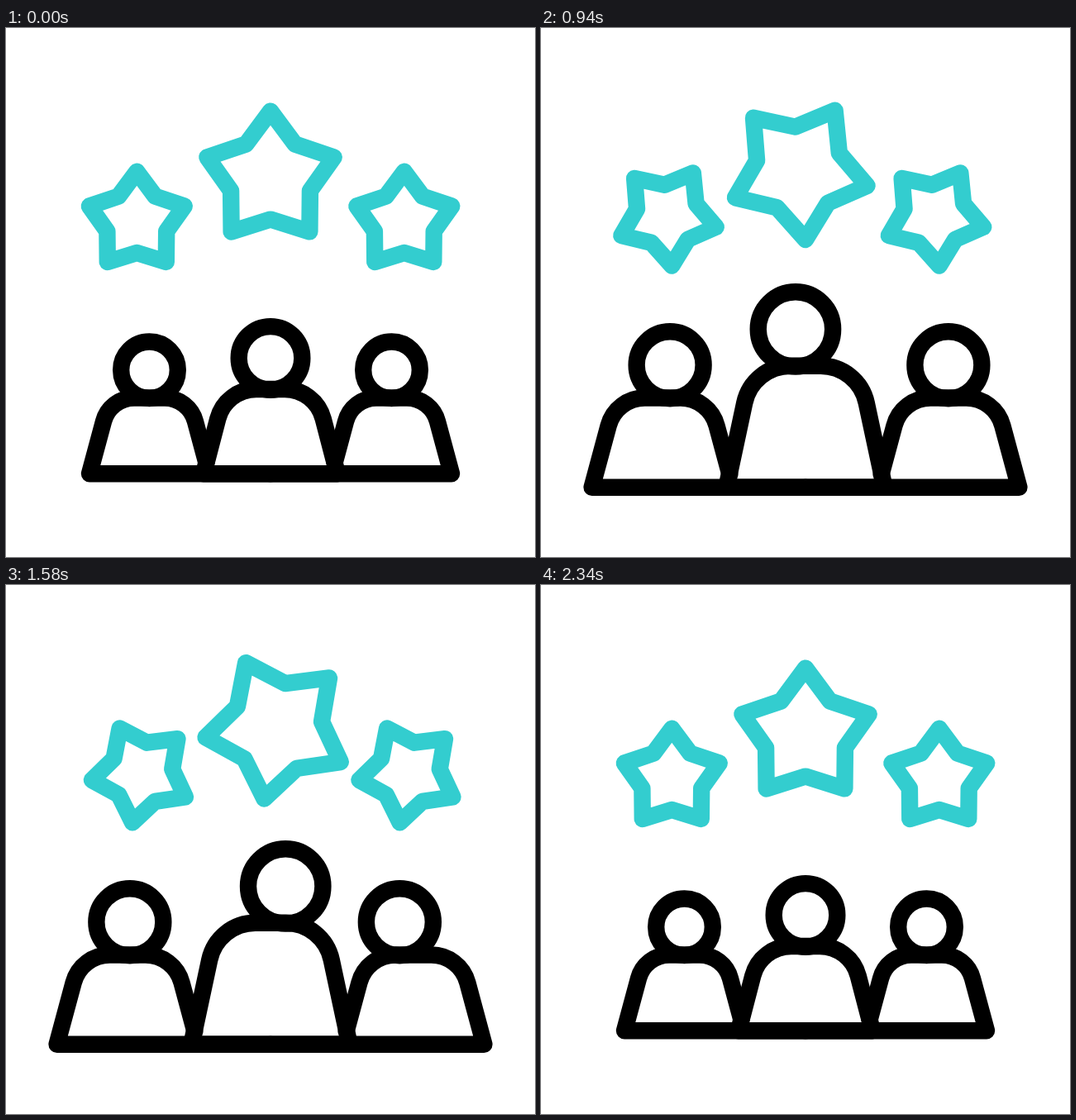
Write an HTML page with a canvas that moves like this. It is 640 by 640 pixels and loops after 2400 ms.

```html
<!DOCTYPE html>
<html lang="en">
<head>
<meta charset="utf-8">
<title>Team rating</title>
<style>
  html, body { margin: 0; width: 100%; height: 100%; overflow: hidden; background: #fff; }
  canvas { display: block; width: 640px; height: 640px; }
</style>
</head>
<body>
<canvas id="stage" width="640" height="640"></canvas>
<script>
const LOOP = 2400;
const TEAL = '#33cdcf';
const LINE = 20.4;
const ctx = document.getElementById('stage').getContext('2d');

// Tracks are [time, value] steps with a smooth ease between them.
const TRACKS = {
  spin:   [[200, 0], [2300, 360]],
  swell:  [[250, 1], [1550, 1.0825], [1800, 1.0825], [2320, 1]],
  grow:   [[200, 0], [700, 1], [1700, 1], [2200, 0]],
  left:   [[700, 0], [1200, 19], [1700, 0]],
  middle: [[700, 0], [1200, -25.5], [1700, 25.5], [2200, 0]],
  right:  [[1200, 0], [1700, -19.3], [2200, 0]],
  spread: [[1700, 0.82], [2200, 1.26]],
  dot:    [[1700, 0], [1850, 10.4], [2000, 10.4], [2300, 0]]
};

function valueAt(name, t) {
  const steps = TRACKS[name];
  if (t <= steps[0][0]) return steps[0][1];
  for (let i = 1; i < steps.length; i++) {
    const [t0, a] = steps[i - 1];
    const [t1, b] = steps[i];
    if (t < t1) {
      const u = (t - t0) / (t1 - t0);
      return a + (b - a) * u * u * (3 - 2 * u);
    }
  }
  return steps[steps.length - 1][1];
}

// The star turns about the middle of its box, which lies above its true centre.
function star(x, y, radius, spin, scale) {
  ctx.save();
  ctx.translate(x, y);
  ctx.rotate(spin * Math.PI / 180);
  ctx.beginPath();
  for (let i = 0; i < 10; i++) {
    const r = radius * scale * (i % 2 ? 0.625 : 1);
    const a = (i * 36 - 90) * Math.PI / 180;
    ctx.lineTo(r * Math.cos(a), r * Math.sin(a) + radius * scale * 0.092);
  }
  ctx.closePath();
  ctx.stroke();
  ctx.restore();
}

function circle(x, y, r) {
  ctx.beginPath();
  ctx.arc(x, y, r, 0, Math.PI * 2);
}

function drawStars(t) {
  const spin = valueAt('spin', t);
  ctx.strokeStyle = ctx.fillStyle = TEAL;
  star(158.3, 228.6, 60.4, spin, 1);
  star(481.8, 228.6, 60.4, spin, 1);
  star(320, 173.8, 80.6, spin, valueAt('swell', t));

  const r = valueAt('dot', t);
  if (r <= 0) return;
  const k = valueAt('spread', t);
  for (const [dx, dy] of [[-98, -54], [97, -54], [-58, 115], [62, 115]]) {
    circle(320 + dx * k, 173.8 + dy * k, r);
    ctx.fill();
  }
}

function drawPeople(t) {
  const grow = valueAt('grow', t);
  const scale = 1 + 0.18 * grow;
  const rise = 26.3 * grow;
  const X = x => 320 + x * scale;
  const Y = y => 447.5 + y * scale;
  const base = Y(91.7);
  ctx.strokeStyle = '#000';

  // Side figures: the inner leg stops short of the base line.
  for (const side of [-1, 1]) {
    ctx.beginPath();
    ctx.moveTo(X(0), base);
    ctx.lineTo(X(219 * side), base);
    ctx.arcTo(X(194.3 * side), Y(0), X(146.5 * side), Y(0), 38.4 * scale);
    ctx.arcTo(X(98.7 * side), Y(0), X(77.6 * side), Y(78.4), 38.4 * scale);
    ctx.lineTo(X(77.6 * side), Y(78.4));
    ctx.stroke();
    circle(X(146.5 * side) + valueAt(side < 0 ? 'left' : 'right', t), Y(-33.7), 34.3 * scale);
    ctx.stroke();
  }

  // Middle figure: its shoulders and head rise while its feet stay on the base.
  const top = Y(-10.5) - rise;
  ctx.beginPath();
  ctx.moveTo(X(-81), base);
  ctx.arcTo(X(-54.4), top, X(0), top, 48 * scale);
  ctx.arcTo(X(54.4), top, X(81), base, 48 * scale);
  ctx.lineTo(X(81), base);
  ctx.closePath();
  ctx.stroke();
  circle(320 + valueAt('middle', t), Y(-48.1) - rise, 38.3 * scale);
  ctx.stroke();
}

function draw() {
  const t = performance.now() % LOOP;
  ctx.fillStyle = '#fff';
  ctx.fillRect(0, 0, 640, 640);
  ctx.lineWidth = LINE;
  ctx.lineJoin = ctx.lineCap = 'round';
  drawStars(t);
  drawPeople(t);
  requestAnimationFrame(draw);
}
draw();
</script>
</body>
</html>
```
